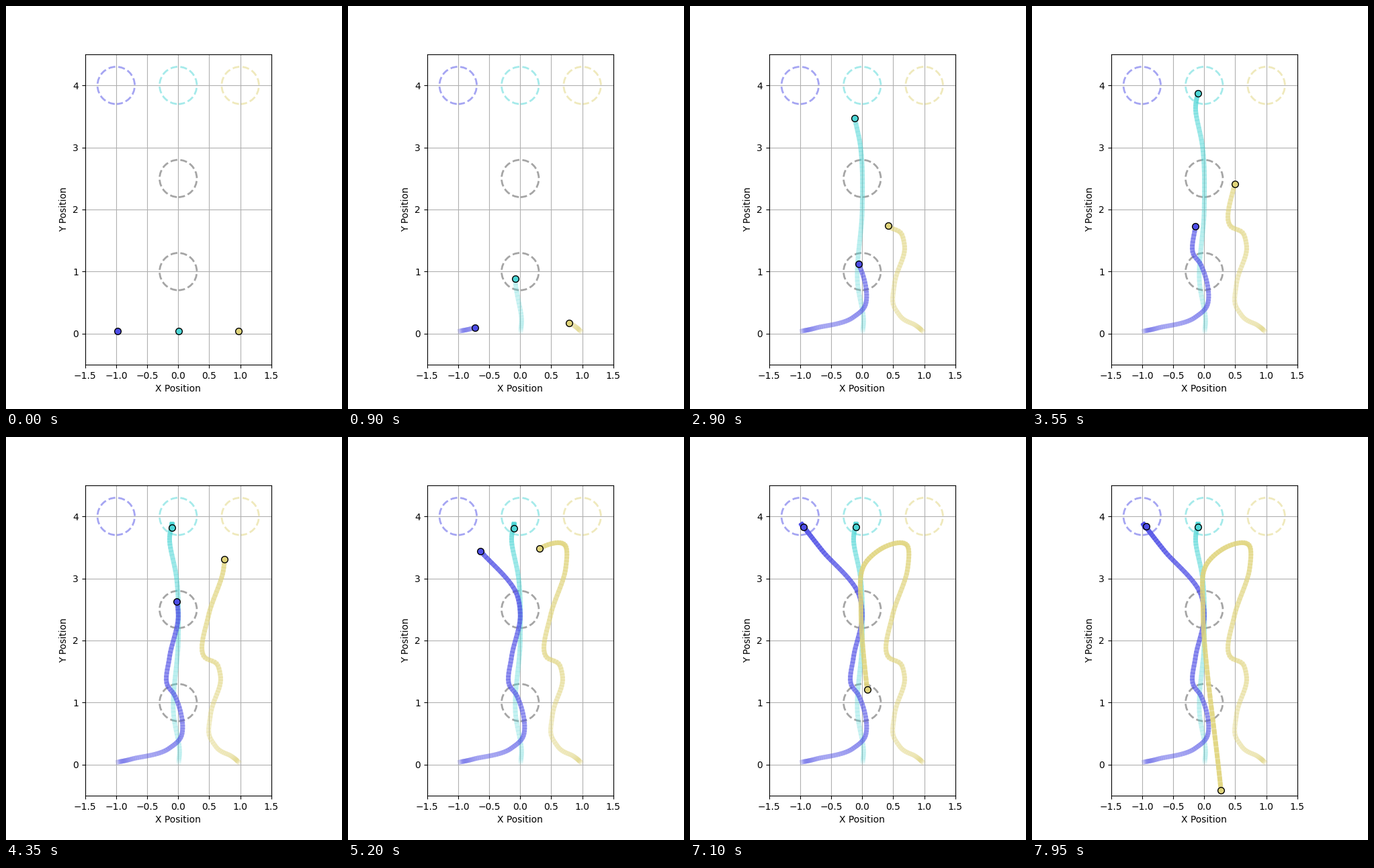
A matplotlib script for the animation above (8 s loop, 500 px wide and 600 px high).

```python
import numpy as np
import matplotlib.pyplot as plt
from matplotlib.animation import FuncAnimation
from matplotlib.collections import LineCollection
from matplotlib.patches import Circle

FRAMES, INTERVAL = 160, 50
BLUE, CYAN, SAND = (0.30, 0.30, 0.90), (0.30, 0.84, 0.84), (0.88, 0.83, 0.48)
GREY = (0.3, 0.3, 0.3)

# Turning points of each agent: step, x, y
blue_keys = [
    (0, -.975, .04), (18, -.73, .095), (35, -.15, .26), (43, .045, .45),
    (58, -.06, 1.12), (63, -.18, 1.3), (71, -.14, 1.73), (83, 0, 2.42),
    (89, -.05, 2.73), (104, -.636, 3.44), (118, -.965, 3.86),
    (126, -.955, 3.84), (159, -.93, 3.84)]
cyan_keys = [
    (0, .01, .04), (7, .02, .26), (17, -.075, .82), (35, 0, 2),
    (51, -.03, 3.03), (60, -.135, 3.57), (70, -.1, 3.87),
    (76, -.1, 3.85), (159, -.1, 3.83)]
sand_keys = [
    (0, .975, .04), (15, .85, .14), (25, .6, .3), (30, .495, .5),
    (35, .52, .8), (48, .68, 1.43), (52, .63, 1.61), (58, .42, 1.74),
    (71, .49, 2.41), (84, .73, 3.15), (92, .73, 3.52), (104, .31, 3.48),
    (112, .04, 3.23), (126, -.02, 2.51), (159, .27, -.41)]


def smooth(keys):
    """Cubic Hermite curve through the turning points, one point per step."""
    keys = np.array(keys, float)
    t, p = keys[:, 0], keys[:, 1:]
    m = np.gradient(p, t, axis=0)
    steps = np.arange(FRAMES)
    k = np.clip(np.searchsorted(t, steps, side="right") - 1, 0, len(t) - 2)
    h = (t[k + 1] - t[k])[:, None]
    u = (steps - t[k])[:, None] / h
    ease = u**2 * (3 - 2 * u)
    return (p[k] + ease * (p[k + 1] - p[k])
            + h * u * (1 - u) * ((1 - u) * m[k] - u * m[k + 1]))


colors = [BLUE, CYAN, SAND]
paths = [smooth(keys) for keys in (blue_keys, cyan_keys, sand_keys)]

# Trail pieces in order of time, each one a little more opaque
segments, shades = [], []
for i in range(1, FRAMES):
    for path, color in zip(paths, colors):
        segments.append(path[i - 1:i + 1])
        shades.append((*color, 0.1 + 0.004 * i))

fig, ax = plt.subplots(figsize=(5, 6), dpi=100)
ax.set_xlim(-1.5, 1.5)
ax.set_ylim(-0.5, 4.5)
ax.set_aspect("equal")
ax.set_xlabel("X Position")
ax.set_ylabel("Y Position")
ax.grid(True)

rings = [(-1, 4, BLUE), (0, 4, CYAN), (1, 4, SAND), (0, 2.5, GREY), (0, 1, GREY)]
for x, y, color in rings:
    ax.add_patch(Circle((x, y), 0.3, fill=False, ec=color, ls="--", lw=2, alpha=0.5))

trail = LineCollection([], colors=shades, linewidths=5,
                       capstyle="projecting", zorder=2)
ax.add_collection(trail, autolim=False)
dots = [ax.plot([], [], "o", ms=7, mfc=c, mec="black", mew=1, zorder=3)[0]
        for c in colors]


def update(i):
    trail.set_segments(segments[:3 * i])
    for dot, path in zip(dots, paths):
        dot.set_data(path[i:i + 1, 0], path[i:i + 1, 1])
    return [trail, *dots]


anim = FuncAnimation(fig, update, frames=FRAMES, interval=INTERVAL,
                     repeat=True, repeat_delay=0)
plt.show()
```
